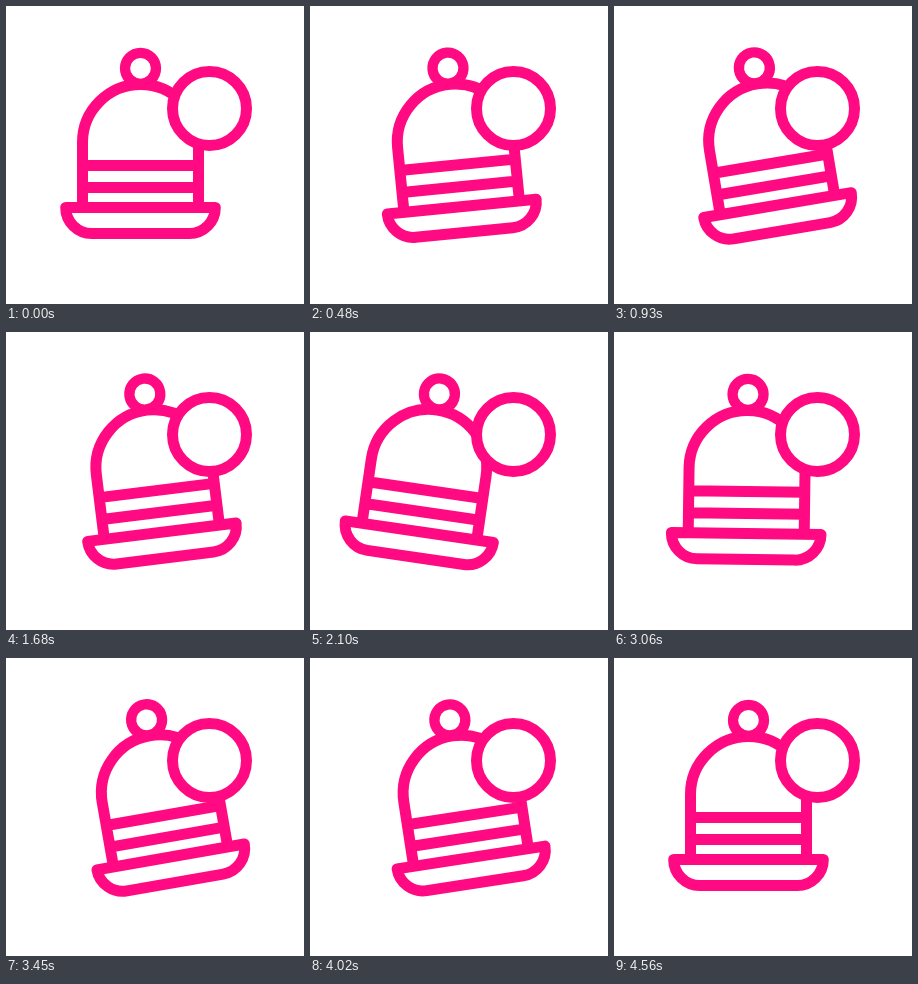
Animation of 298x298 px, one loop 4800 ms. Source, as an HTML page:

```html
<!DOCTYPE html>
<html lang="en">
<head>
<meta charset="utf-8">
<title>Swinging bell</title>
<style>
  html, body { margin: 0; width: 100%; height: 100%; overflow: hidden; background: #fff; }
  svg { display: block; width: 100%; height: 100%; }
</style>
</head>
<body>
<svg viewBox="0 0 298 298" fill="none" stroke="#ff0a82" stroke-width="11" stroke-linejoin="round">
  <g id="bell">
    <circle cx="134.5" cy="62.3" r="15.5" stroke-width="10.3"/>
    <path d="M76.5 201.5V136.5a58 58 0 0 1 116 0V201.5M76.5 159.5h116M76.5 181.5h116"/>
    <path d="M59.7 201.5H209.3A26 26 0 0 1 183.3 227.5H85.7A26 26 0 0 1 59.7 201.5Z"/>
  </g>
  <circle cx="203.5" cy="102.5" r="37" fill="#fff"/>
</svg>
<script>
const LOOP = 4800, STEP = 30;
const bell = document.getElementById('bell');

const cubicIn = u => u ** 3;
const cubicOut = u => 1 - (1 - u) ** 3;
const cubicInOut = u => u < 0.5 ? 4 * u ** 3 : 1 - 4 * (1 - u) ** 3;

// Bezier timing from (0,0) to (1,1) with level handles at x1 and x2
const levelBezier = (x1, x2) => u => {
  let lo = 0, hi = 1;
  for (let i = 0; i < 24; i++) {
    const s = (lo + hi) / 2, r = 1 - s;
    const x = 3 * s * r * r * x1 + 3 * s * s * r * x2 + s ** 3;
    if (x < u) lo = s; else hi = s;
  }
  return lo * lo * (3 - 2 * lo);
};

// start, end, from angle, to angle, easing
const swings = [
  [210, 1320, 0, -10, cubicOut],
  [1320, 2400, -10, 10, cubicInOut],
  [2400, 3480, 10, -10, levelBezier(0.65, 0.7)],
  [3480, 4560, -10, 0, cubicIn],
];

function angleAt(t) {
  if (t < 240) return 0;
  const swing = swings.find(([start, end]) => t >= start && t < end);
  if (!swing) return 0;
  const [start, end, from, to, ease] = swing;
  return from + (to - from) * ease((t - start) / (end - start));
}

let origin;
function draw(now) {
  origin ??= now;
  const t = Math.floor(((now - origin) % LOOP) / STEP + 0.01) * STEP;
  bell.setAttribute('transform', `rotate(${angleAt(t)} 134.5 27)`);
  requestAnimationFrame(draw);
}
requestAnimationFrame(draw);
</script>
</body>
</html>
```
